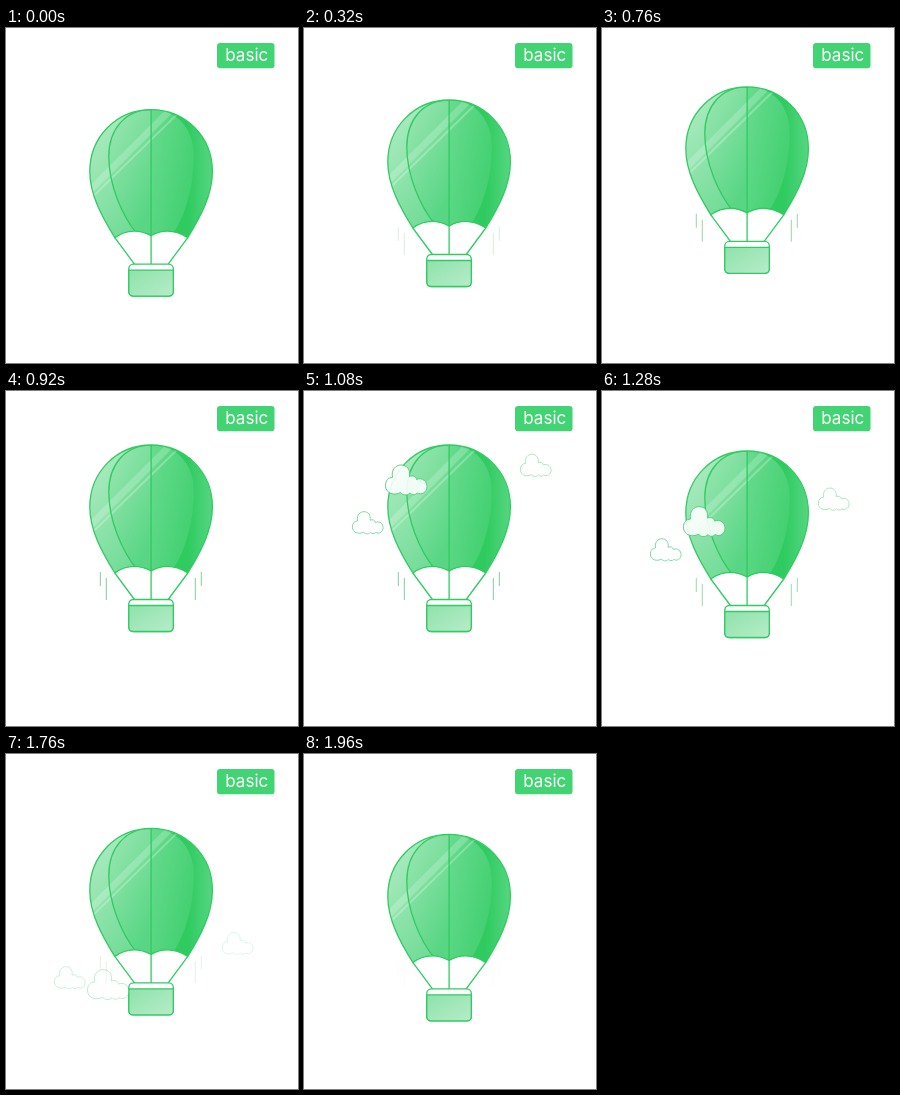
Recreate the animation shown at these times as an HTML page. Size 292x335 px, loop 2000 ms.

```html
<!DOCTYPE html>
<html lang="en">
<head>
<meta charset="utf-8">
<title>Balloon</title>
<style>
html, body { margin: 0; width: 100%; height: 100%; overflow: hidden; background: #fff; }
svg { display: block; }
text { font: 17px Inter, "Liberation Sans", sans-serif; fill: #fff; }
</style>
</head>
<body>
<svg width="292" height="335" viewBox="0 0 292 335" fill="none">
  <defs>
    <path id="envelope" d="M109 209C96 188 84 166 84 143C84 108 111 81 145.3 81S206.6 108 206.6 143C206.6 166 195 188 182 209Q163 197 145.3 207Q126 197 109 209Z"/>
    <path id="cloud" d="M7.5 13C6 5 11 .5 16 .5C22 .5 25.5 5 24.5 12C28 10.5 31 12 31.5 15C37.5 12.5 42 17 42 22C42 28 36.5 31 32 28.5C30 31 26.5 30.5 25 28.5C22 31.5 17.5 31 15.5 28C10 31.5 .5 29.5 .5 21C.5 16 3.5 13 7.5 13Z"/>
    <clipPath id="inside"><use href="#envelope"/></clipPath>
    <linearGradient id="pale" x1="0" y1="0" x2=".5" y2="1">
      <stop stop-color="#b4edc6"/><stop offset="1" stop-color="#72dc97"/>
    </linearGradient>
    <linearGradient id="mid" x1="0" y1="0" x2=".6" y2="1">
      <stop stop-color="#9ce7b4"/><stop offset="1" stop-color="#58d684"/>
    </linearGradient>
    <linearGradient id="deep" x1="0" y1="0" x2="1" y2=".6">
      <stop stop-color="#68db8f"/><stop offset="1" stop-color="#42d070"/>
    </linearGradient>
    <linearGradient id="edge" x1=".6" x2="1">
      <stop stop-color="#2fcb60"/><stop offset="1" stop-color="#56d681"/>
    </linearGradient>
    <linearGradient id="wicker" x1="0" y1="0" x2="1" y2="1">
      <stop stop-color="#8fe2ab"/><stop offset="1" stop-color="#b6ecc8"/>
    </linearGradient>
  </defs>

  <g id="balloon" stroke="#30cb62" stroke-width="1.3">
    <g id="wind" stroke="#7cc796" stroke-width="1">
      <path d="M94.5 208v14M100.5 214v22M195.5 208v14M189.5 214v22"/>
    </g>
    <g clip-path="url(#inside)" stroke="none">
      <rect x="84" y="81" width="61.3" height="130" fill="url(#pale)"/>
      <path d="M145.3 81C120 81 103 100 103 128C103 156 116 187 131 205L145.3 210Z" fill="url(#mid)"/>
      <path d="M145.3 81H207V211H145.3Z" fill="url(#edge)"/>
      <path d="M145.3 81C171 81 188 100 188 128C188 156 180 187 167 205L145.3 210Z" fill="url(#deep)"/>
      <path d="M84 162L164 82" stroke="#fff" stroke-opacity=".2" stroke-width="7"/>
      <path d="M88 167L174 83" stroke="#fff" stroke-opacity=".25" stroke-width="2"/>
      <path d="M145.3 81C120 81 103 100 103 128C103 156 116 187 131 205M145.3 81V208" stroke="#30cb62"/>
    </g>
    <use href="#envelope"/>
    <path d="M109 209L129 236M145.3 207V236M182 209L162 236"/>
    <rect x="123" y="235.5" width="44.5" height="32" rx="4.5" fill="#fff"/>
    <path d="M123 241.5H167.5V263Q167.5 267.5 163 267.5H127.5Q123 267.5 123 263Z" fill="url(#wicker)"/>
  </g>

  <g id="clouds" stroke="#4fd07c" fill="#fff" fill-opacity=".93"></g>

  <rect x="211" y="15" width="57.5" height="25.3" rx="3" fill="#42d373"/>
  <text x="219.3" y="33.3">basic</text>
</svg>
<script>
const LOOP = 2000, STEP = 40;
const $ = id => document.getElementById(id);
const clamp = v => Math.max(0, Math.min(1, v));

// y is the height at time 0, speed is in px per ms
const clouds = [
  { x: 48, y: -25.7, speed: .1352, scale: .74, alpha: .75 },
  { x: 216, y: -120, speed: .1693, scale: .74, alpha: .5 },
  { x: 81, y: -151.5, speed: .2083, scale: 1, alpha: .95 }
];
for (const c of clouds) {
  c.node = document.createElementNS("http://www.w3.org/2000/svg", "use");
  c.node.setAttribute("href", "#cloud");
  c.node.setAttribute("stroke-width", 1 / c.scale);
  $("clouds").append(c.node);
}

function draw(now) {
  const t = Math.floor(now % LOOP / STEP) * STEP;
  const rise = 1 - Math.abs(t - 1000) / 1000;
  const fade = clamp(t / 500) * clamp((1960 - t) / 500);
  $("balloon").setAttribute("transform", `translate(-.2 ${.6 - 30 * rise})`);
  $("wind").setAttribute("opacity", rise);
  for (const c of clouds) {
    c.node.setAttribute("transform", `translate(${c.x} ${c.y + c.speed * t}) scale(${c.scale})`);
    c.node.setAttribute("opacity", c.alpha * fade);
  }
}

const start = performance.now();
function tick() {
  draw(performance.now() - start);
  requestAnimationFrame(tick);
}
tick();
</script>
</body>
</html>
```
